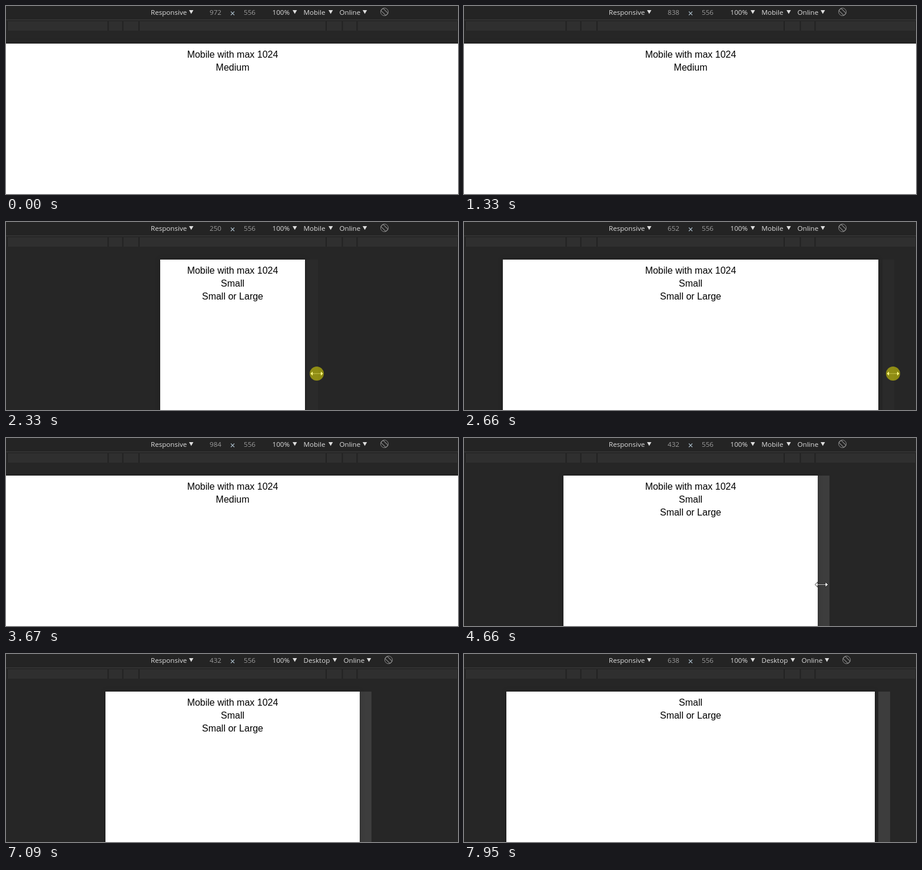
Animation of 768 by 320 pixels, one loop 8 s. Source, as an HTML page:

```html
<!DOCTYPE html>
<html lang="en">
<head>
<meta charset="utf-8">
<title>Responsive viewport</title>
<style>
  html, body { margin: 0; width: 100%; height: 100%; overflow: hidden; background: #262626; }
  svg { display: block; width: 768px; height: 320px; }
  .bar { font: 11.6px "Open Sans", "Noto Sans", sans-serif; fill: #dedede; }
  .dim { fill: #9c9c9c; }
  .page { font: 16px "Liberation Sans", Arial, sans-serif; text-anchor: middle; fill: #000; }
  .menu { font: 12px "Open Sans", "Noto Sans", sans-serif; fill: #111; }
  #page { filter: drop-shadow(0 0 4px rgba(0, 0, 0, .2)); }
</style>
</head>
<body>
<svg id="stage" viewBox="0 0 768 320">
  <rect width="768" height="320" fill="#262626"/>
  <rect width="768" height="23" fill="#242424"/>
  <rect y="23" width="768" height="1" fill="#3d3d3d"/>
  <g id="ruler"><rect y="26" width="768" height="16" fill="#2f2f2f"/></g>
  <rect id="handle" y="64" width="20" height="256"/>
  <rect id="page" y="64" height="270" fill="#fff"/>
  <g id="lines" class="page"></g>
  <g class="bar">
    <text x="246" y="15">Responsive</text>
    <text id="size" class="dim" x="346" y="15"></text>
    <path d="M382 9.5l6 6m0-6l-6 6" stroke="#a6b8c4" stroke-width="1.1"/>
    <text class="dim" x="404" y="15">556</text>
    <text x="452.5" y="15">100%</text>
    <text id="type" x="505.5" y="15"></text>
    <path d="M311 7h7.4l-3.7 6.4zM487 7h7.4l-3.7 6.4z"/>
    <g id="network">
      <path d="M548 7h7.4l-3.7 6.4zM606 7h7.4l-3.7 6.4z"/>
      <text x="566.5" y="15">Online</text>
      <g fill="none" stroke="#929292" transform="translate(643 10)">
        <rect x="-2.6" y="-6" width="5.2" height="12" rx="1" transform="rotate(-45)"/>
        <circle r="6.5" stroke-width=".9"/>
      </g>
    </g>
  </g>
  <g id="menu" class="menu">
    <rect x="501.5" y="22.5" width="149" height="107" fill="#fff" stroke="#bababa"/>
    <rect id="hover" x="502" width="148" height="24" fill="#e3e3e3"/>
    <path d="M511 40l3 3 6-7" fill="none" stroke="#333" stroke-width="1.5"/>
  </g>
  <g id="cursor">
    <path id="resize" d="M-11 0l4.5-4.5v3.7h13v-3.7L11 0l-4.5 4.5V.8h-13v3.7z" fill="#fff" stroke="#222" stroke-width=".9"/>
    <path id="arrow" d="M.5 .5v16l3.7-3.6 2.4 5.6 2.3-1-2.4-5.4h5z" fill="#fff" stroke="#111"/>
    <circle id="touch" r="11.5" fill="#464646" fill-opacity=".5"/>
    <circle id="press" r="12" fill="#f5f000" fill-opacity=".5"/>
  </g>
</svg>
<script>
const LOOP = 8000, STEP = 77.9, LAG = 10, MID = 385, MEDIUM = 768;
const $ = id => document.getElementById(id);
const svg = (parent, tag, attrs, text = "") => {
  const el = document.createElementNS("http://www.w3.org/2000/svg", tag);
  for (const key in attrs) el.setAttribute(key, attrs[key]);
  el.textContent = text;
  return parent.appendChild(el);
};
const set = (id, name, value) => $(id).setAttribute(name, value);
const show = (id, on) => { $(id).style.display = on ? "" : "none"; };
const within = (t, a, b) => t >= a && t < b;
const even = v => 2 * Math.round(v / 2);

// Eased progress from a to b
const ease = (t, a, b) => {
  const p = Math.min(1, Math.max(0, (t - a) / (b - a)));
  return (1 - Math.cos(Math.PI * p)) / 2;
};
// Follow moves of { from, to, at }, each starting where the last one ended
const follow = (moves, start, t) =>
  moves.reduce((v, m) => v.map((n, i) => n + (m.at[i] - n) * ease(t, m.from, m.to)), start);

const drags = [
  { from: 960, to: 2225, at: [236] },
  { from: 2270, to: 2830, at: [800] },
  { from: 2700, to: 3330, at: [996] },
  { from: 3495, to: 3640, at: [984] },
  { from: 3640, to: 4430, at: [432] },
  { from: 7620, to: 8800, at: [1670] } // still growing when the loop ends
];
const moves = [
  { from: 4700, to: 5050, at: [504, 1] },
  { from: 5270, to: 5350, at: [522, 13] },
  { from: 5690, to: 6220, at: [548, 86] },
  { from: 6700, to: 7085, at: [612, 322] }
];
const items = ["Mobile", "Mobile (no touch)", "Desktop", "Desktop (touch)"];
const widthAt = t => even(follow(drags, [972], t)[0]);

for (const w of [320, 375, 425, 768])
  for (const side of [-1, 1])
    svg($("ruler"), "rect", { x: MID + side * (w / 2 - 1) - 1, y: 26, width: 2, height: 16, fill: "#222" });
items.forEach((name, i) => svg($("menu"), "text", { x: 530, y: 44 + i * 24 }, name));
const rows = [88, 110, 132].map(y => svg($("lines"), "text", { x: MID, y }));

function drawPage(t, q) {
  const edge = MID + widthAt(q) / 2;
  const painted = widthAt(q - LAG); // the page repaints a little late
  const desktop = t >= 6620;
  set("page", "x", MID - painted / 2);
  set("page", "width", painted);
  set("handle", "x", edge);
  set("handle", "fill", t < 3510 ? "#2a2a2a" : "#3d3d3d");
  $("size").textContent = widthAt(q);

  const lines = painted < MEDIUM ? ["Small", "Small or Large"] : ["Medium"];
  if (t < 7630) lines.unshift("Mobile with max 1024");
  rows.forEach((row, i) => { row.textContent = lines[i] || ""; });

  $("type").textContent = desktop ? "Desktop" : "Mobile";
  set("network", "transform", `translate(${desktop ? 7 : 0} 0)`);
  return edge;
}

function pointerAt(t, q, edge) {
  if (t < 150) return [745.5, 309];
  if (t >= 4740) return follow(moves, [607, 249], q).map(Math.round);
  const slip = ease(q, 1704, 2327);
  return t < 3510 ? [edge + 18 * slip, 245 + 13 * slip] : [edge + 6.5, 249.5];
}

function drawPointer(t, q, edge) {
  const dragging = within(t, 1010, 3340) || within(t, 3510, 4740);
  const free = within(t, 4740, 7090);
  const tap = within(t, 70, 150);
  const [x, y] = pointerAt(t, q, edge);
  const touching = tap || (free && t < 5000 && y > 64);

  show("cursor", dragging || free || tap);
  set("cursor", "transform", `translate(${x} ${y})`);
  show("resize", dragging);
  show("touch", touching);
  show("arrow", free && !touching);
  show("press", (dragging && t < 4600) || within(t, 5530, 5600) || within(t, 6550, 6620));

  const row = Math.floor((y - 28) / 24);
  show("menu", within(t, 5600, 6620));
  show("hover", row >= 0 && row < items.length);
  set("hover", "y", 28 + row * 24);
}

function draw(t) {
  const q = Math.max(0, Math.floor((t + 10) / STEP) * STEP - 10);
  drawPointer(t, q, drawPage(t, q));
}

const start = performance.now();
function tick() {
  draw((performance.now() - start) % LOOP);
  requestAnimationFrame(tick);
}
tick();
</script>
</body>
</html>
```
